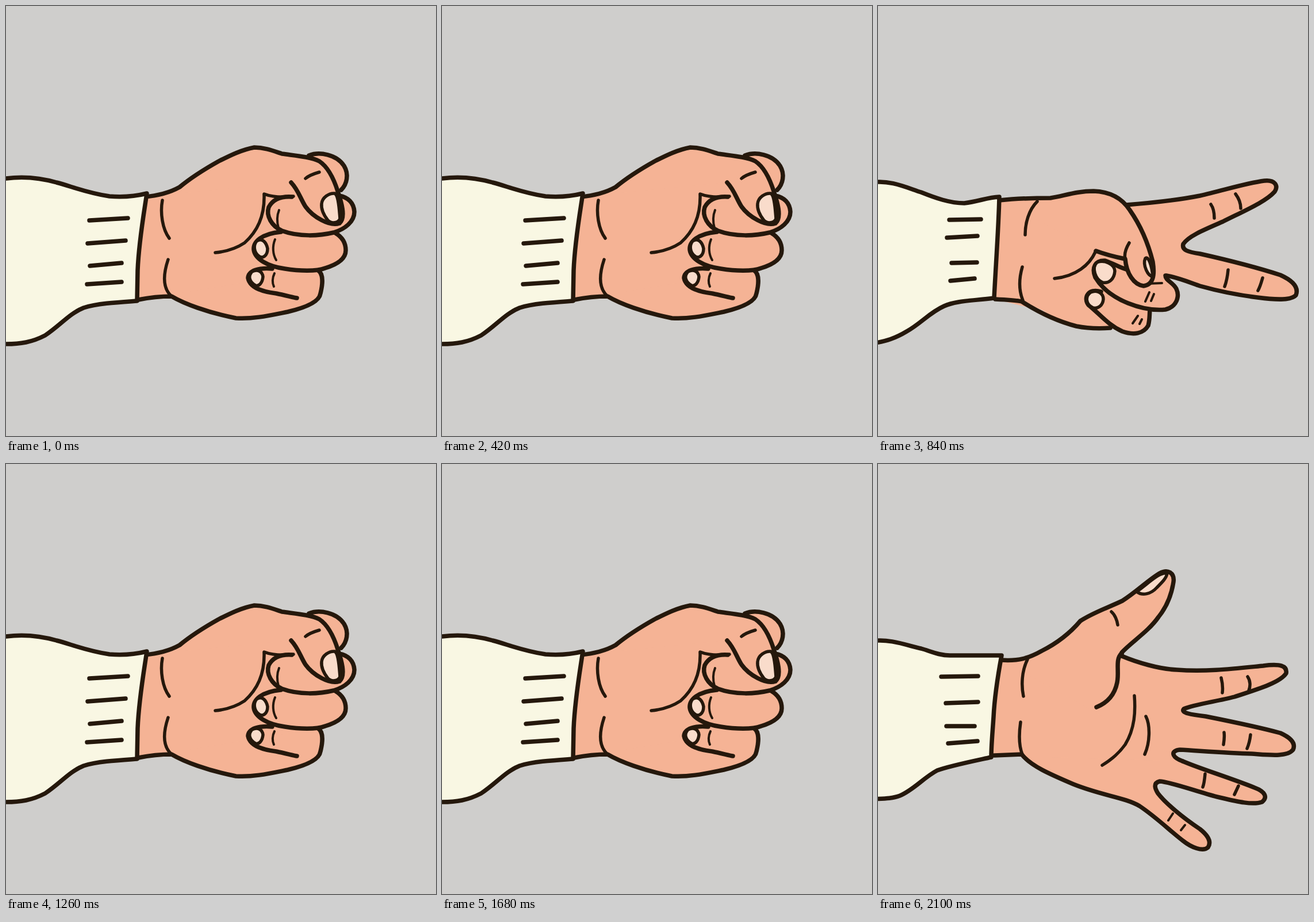
These frames come from a looping animation (748x748 px, 2520 ms). An HTML page without scripts:

```html
<!DOCTYPE html>
<html lang="en">
<head>
<meta charset="utf-8">
<title>Rock, scissors, paper</title>
<style>
  html, body { margin: 0; width: 100%; height: 100%; overflow: hidden; background: #cfcecc; }
  svg { display: block; width: 100%; height: 100%; }

  path { fill: none; stroke: #25180c; stroke-width: 7.5; stroke-linecap: round; stroke-linejoin: round; }
  .skin { fill: #f5b395; }
  .flat { stroke: none; }
  .sleeve { fill: #f9f7e3; }
  .nail { fill: #f9dccb; stroke-width: 5.5; }
  .crease { stroke-width: 5.5; }
  .fine { stroke-width: 4; }

  .pose { animation: 2520ms step-end infinite; }
  .rock { animation-name: rock; }
  .scissors { animation-name: scissors; }
  .paper { animation-name: paper; }
  .swing { animation: swing 2520ms step-end infinite; }

  @keyframes rock {
    0%, 50% { visibility: visible; }
    33.3333%, 83.3333%, 100% { visibility: hidden; }
  }
  @keyframes scissors {
    0%, 50%, 100% { visibility: hidden; }
    33.3333% { visibility: visible; }
  }
  @keyframes paper {
    0% { visibility: hidden; }
    83.3333%, 100% { visibility: visible; }
  }
  /* The fist pumps by turning around the top of the cuff. */
  @keyframes swing {
    0%, 16.6667%, 33.3333%, 50%, 66.6667%, 83.3333%, 100% { transform: none; }
    8.3333%, 25%, 58.3333%, 75% {
      transform: translate(212.5px, 249.5px) rotate(-21.6deg) translate(-245px, -327px);
    }
  }
</style>
</head>
<body>
<svg viewBox="0 0 748 748">
  <g class="pose rock"><g class="swing">
    <!-- index finger, palm, heel of the hand -->
    <path class="skin" d="M527 260C545 253 575 258 588 278C597 293 593 310 583 320"/>
    <path class="skin flat" d="M236 331L449 300L545 272L580 330L575 395L545 460L520 500L224 511Z"/>
    <path class="skin" d="M230 511C255 506 275 505 288 505C310 518 350 533 400 543C430 545 460 538 490 532C520 525 545 515 547 500C552 480 551 465 543 460"/>
    <!-- curled fingers -->
    <path class="skin" d="M463 457C440 455 422 460 421 473C424 490 445 497 470 500C485 503 500 507 506 508"/>
    <path class="skin" d="M478 393C445 396 430 410 431 424C433 440 455 453 485 457C510 461 540 462 555 456C575 450 591 440 591 425C591 412 585 402 573 395"/>
    <path class="skin" d="M497 332C480 331 465 335 457 350C452 365 462 383 480 391C510 402 545 400 570 394C590 388 606 375 606 358C605 342 595 333 580 330"/>
    <path class="nail" d="M436 409C446 402 453 412 455 422C455 435 446 440 440 435C431 429 430 416 436 409Z"/>
    <path class="nail" d="M428 462C438 457 446 462 447 471C446 482 440 488 434 486C424 481 420 470 428 462Z"/>
    <path class="fine" d="M475 355C471 365 471 375 474 386M468 406C463 418 464 432 470 442M467 465C463 473 463 482 466 488"/>
    <!-- back of the hand and thumb -->
    <path class="skin" d="M240 332C265 330 286 324 302 315C319 301 345 284 370 270C390 260 410 250 432 246C450 246 465 252 480 257C500 260 530 262 545 270C560 280 570 300 577 322C583 340 592 368 580 378C563 384 534 367 521 349C512 335 509 321 496 307"/>
    <path class="nail" d="M549 344C550 333 562 325 572 326C579 330 580 360 581 370C578 378 566 379 560 373C553 364 548 353 549 344Z"/>
    <path class="crease" d="M449 327C465 333 485 333 500 331M449 328C450 360 440 390 415 412C400 422 385 427 364 429M521 300C528 294 538 291 545 289M272 338C268 360 272 388 284 404M282 441C274 465 272 490 287 504"/>
    <path class="sleeve" d="M-120 345C-80 315 -40 302 0 300C30 296 60 299 88 307C115 314 140 325 180 331C205 333 225 331 245 326C240 360 231 410 229 460L228 513C200 515 160 517 135 525C110 535 95 555 68 573C45 585 25 588 0 588C-30 589 -65 596 -94 605L-130 620"/>
    <path d="M145 373L212 369M142 413L208 408M146 452L201 447M141 484L201 480"/>
  </g></g>

  <g class="pose scissors">
    <path class="skin flat" d="M203 338L380 330L440 350L530 418L505 475L470 535L404 560L330 548L250 514L197 510Z"/>
    <!-- stretched fingers -->
    <path class="skin" d="M432 346C470 343 520 338 560 330C600 321 640 308 672 304C690 302 697 312 690 323C675 340 640 355 600 375C570 388 540 400 531 414C528 425 540 428 560 431C600 440 660 455 700 468C722 478 732 490 727 503C718 513 690 511 660 507C620 502 585 494 560 487C540 480 520 472 502 469"/>
    <path class="crease" d="M579 345C584 352 585 360 585 369M622 327C628 335 631 345 631 352M609 459C608 470 606 480 603 488M669 473C667 480 665 488 661 495"/>
    <path class="skin" d="M204 510C225 511 240 512 250 514C275 530 310 548 345 557C365 561 390 561 404 560"/>
    <!-- curled fingers -->
    <path class="skin" d="M388 497C365 490 357 508 366 520C385 535 400 555 425 566C445 573 462 570 470 556C473 545 472 538 473 528"/>
    <path class="skin" d="M432 458C420 455 408 447 395 443C378 442 371 455 378 472C390 492 410 507 435 517C460 527 480 530 500 528C520 523 525 505 519 492C513 480 500 478 500 469"/>
    <path class="nail" d="M381 446C394 441 411 449 412 461C411 475 402 483 391 481C378 476 371 455 381 446Z"/>
    <path class="nail" d="M370 498C382 493 392 500 392 510C391 521 383 527 374 525C361 519 360 505 370 498Z"/>
    <path class="fine" d="M472 498L465 514M480 501L475 513M452 539L443 552M459 545L455 553M468 483L494 482"/>
    <!-- back of the hand and thumb -->
    <path class="skin" d="M211 338C240 335 270 334 300 334C325 330 345 322 375 322C405 323 425 335 438 355C452 375 468 405 478 445C482 470 478 485 462 487C445 485 432 465 430 440C415 437 395 432 379 426"/>
    <path class="nail" d="M465 439C470 434 476 450 478 470C470 472 460 450 465 439Z"/>
    <path class="crease" d="M437 412C431 422 428 432 430 440M378 428C368 450 345 470 307 474M277 340C262 355 256 378 256 398M251 454C245 475 245 495 252 512"/>
    <path class="sleeve" d="M-10 307C20 302 50 316 75 324C100 334 125 343 150 343C175 340 190 333 211 332C210 380 205 450 202 508C160 513 135 513 115 522C90 533 75 552 50 566C30 578 15 583 -10 587"/>
    <path d="M124 372L179 371M120 403L173 400M128 447L172 446M126 478L168 474"/>
  </g>

  <g class="pose paper">
    <path class="skin flat" d="M205 341L424 334L530 428L513 500L530 517L483 555L455 595L340 557L250 505L194 507Z"/>
    <!-- lower two fingers and heel, then thumb and upper two fingers -->
    <path class="skin" d="M530 517C560 530 610 545 655 563C674 570 678 580 668 588C650 594 620 586 590 579C555 570 510 553 490 552C478 555 482 565 487 573C500 590 530 615 560 635C575 647 580 658 574 667C565 675 545 667 530 655C510 640 485 615 455 595C430 580 390 577 340 557C300 540 265 525 250 505L202 507"/>
    <path class="skin" d="M214 341C245 343 262 338 285 325C315 310 335 293 352 273C375 258 400 250 425 238C450 222 470 202 490 190C505 182 516 190 514 205C511 225 505 245 488 266C470 292 440 310 424 328L424 334C450 345 490 357 520 358C570 362 620 356 670 351C700 347 712 351 710 364C700 380 660 392 620 405C590 413 550 418 532 426C526 433 545 436 570 439C610 447 660 457 700 468C722 478 726 488 722 497C712 510 680 506 650 504C610 503 560 499 525 497C508 499 511 510 530 517"/>
    <path class="nail" d="M450 222C460 230 475 226 485 215C495 205 502 198 503 190C490 187 470 208 450 222Z"/>
    <path d="M424 329C412 340 420 360 416 380C412 400 400 415 380 423"/>
    <path class="crease" d="M446 403C448 430 447 460 430 488C420 502 405 515 390 524M466 439C474 455 473 485 464 505M260 340C250 360 249 385 253 404M248 449C245 470 245 490 251 505M406 257C412 262 416 272 417 280"/>
    <path class="crease" d="M597 372C599 380 600 390 599 398M643 370C648 377 648 387 645 394M602 467C603 475 602 482 601 488M648 471C647 480 645 488 642 495M569 539C568 550 567 557 565 562M627 560L620 575"/>
    <path class="fine" d="M513 608L505 620M534 628L527 637"/>
    <path class="sleeve" d="M-10 308C20 303 55 317 75 321C90 325 105 333 125 333L215 333C210 360 203 400 201 440C199 470 197 490 197 510C165 517 125 525 103 533C80 545 62 567 38 577C25 582 10 582 -10 583"/>
    <path d="M110 370L174 369M118 416L174 414M119 456L168 456M122 486L173 482"/>
  </g>
</svg>
</body>
</html>
```
